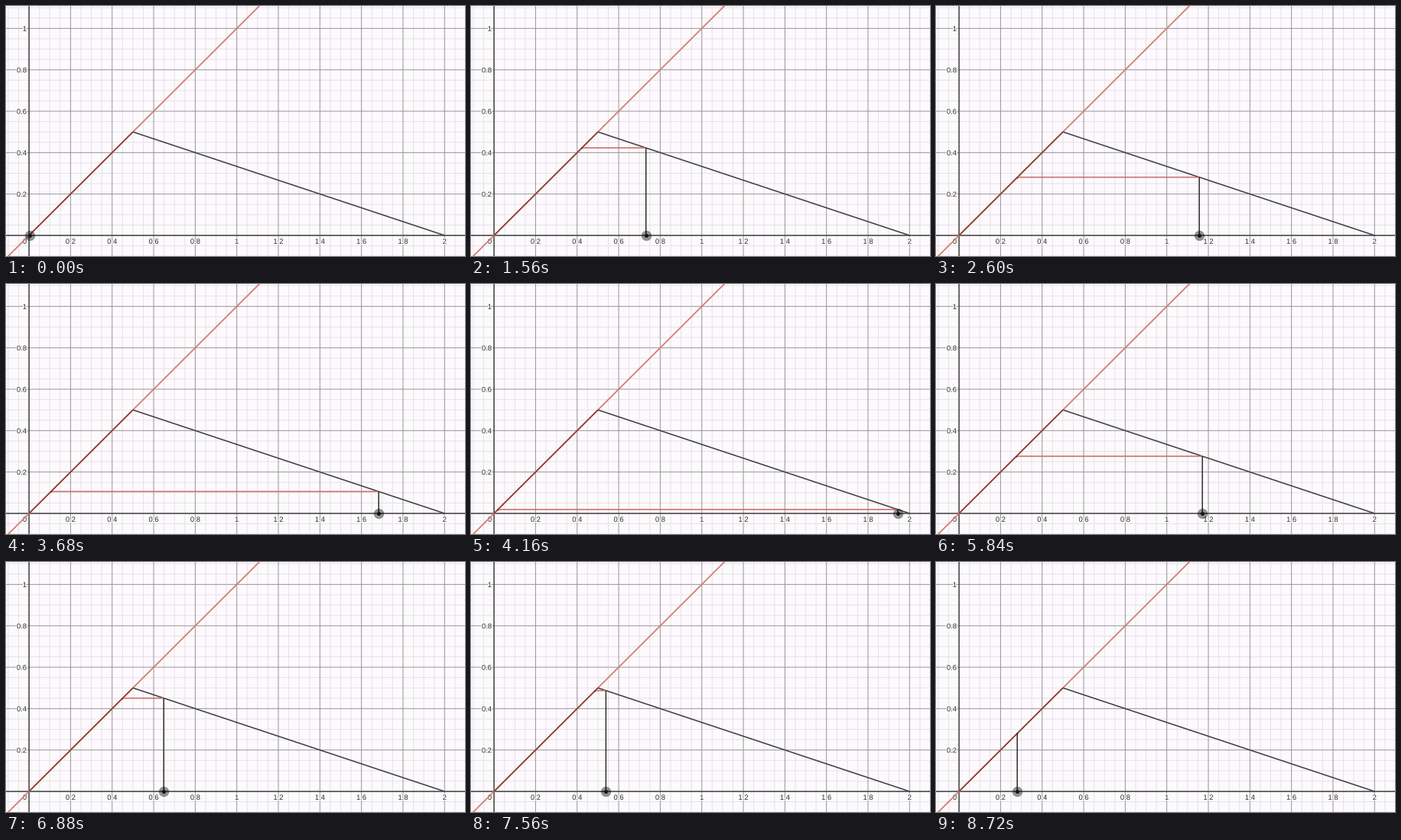
Animation of 600 by 328 pixels, one loop 9120 ms. Source, as a matplotlib script:

```python
import matplotlib.pyplot as plt
import matplotlib.patheffects as pe
import numpy as np
from matplotlib.animation import FuncAnimation

W, H, DPI = 600, 328, 100
STEP, LOOP = 40, 9120
PX = 72 / DPI                      # one pixel in points
X0, Y0, UNIT = 30.1, 301.0, 271.6  # origin and pixels per unit

PAPER, MINOR, MAJOR, AXIS = "#fcfafc", "#e6e2e6", "#989598", "#2e2e2e"
RED, DARK, BLEND = "#d67c78", "#434244", "#8a3c38"

# Dragged point: time in ms, position in pixels
PATH = np.array([
    (0, 31), (40, 33), (400, 82), (840, 150), (920, 150), (1120, 178),
    (1240, 178), (1560, 228.5), (2160, 304), (2600, 344), (3080, 423),
    (3680, 487), (4000, 533), (4280, 567), (4920, 469), (5840, 348),
    (6640, 206), (7000, 206), (7680, 166), (7760, 154), (8040, 154),
    (8720, 106), (9120, 106)], dtype=float)


def px(x):
    return X0 + UNIT * x


def py(y):
    return Y0 - UNIT * y


def slopes(t, v):
    """Tangents of a monotone cubic through the points."""
    d = np.diff(v) / np.diff(t)
    m = np.zeros(len(v))
    a, b = d[:-1], d[1:]
    same = a * b > 0
    m[1:-1][same] = 2 * a[same] * b[same] / (a + b)[same]
    m[0], m[-1] = d[0], d[-1]
    return m


TIMES, SPOTS = PATH.T
TANGENTS = slopes(TIMES, SPOTS)


def position(t):
    """Value on the x axis of the dragged point at time t."""
    k = min(np.searchsorted(TIMES, t, side="right") - 1, len(TIMES) - 2)
    h = TIMES[k + 1] - TIMES[k]
    s = (t - TIMES[k]) / h
    spot = ((1 + 2 * s) * (1 - s) ** 2 * SPOTS[k]
            + s * (1 - s) ** 2 * h * TANGENTS[k]
            + s * s * (3 - 2 * s) * SPOTS[k + 1]
            + s * s * (s - 1) * h * TANGENTS[k + 1])
    return (spot + 0.2 - X0) / UNIT


def tent(x):
    return x if x < 0.5 else (2 - x) / 3


fig = plt.figure(figsize=(W / DPI, H / DPI), dpi=DPI, facecolor=PAPER)
ax = fig.add_axes([0, 0, 1, 1])
ax.set_xlim(0, W)
ax.set_ylim(H, 0)
ax.axis("off")


def line(points, color, width, z):
    xs, ys = zip(*points)
    return ax.plot([px(x) for x in xs], [py(y) for y in ys], color=color,
                   lw=width * PX, zorder=z, solid_capstyle="butt",
                   snap=False)[0]


def marker(size, color, z, alpha=1):
    return ax.plot([], [], "o", ms=size * PX, mew=0, color=color,
                   alpha=alpha, zorder=z, snap=False)[0]


def grid(values, color, width, z):
    """Soft lines across the stage at the given values on both axes."""
    style = dict(colors=color, lw=width * PX, zorder=z, snap=False)
    ax.vlines(px(values), 0, H, **style)
    ax.hlines(py(values), 0, W, **style)


def label(x, y, text, ha="center"):
    ax.text(x, y, text, family="Liberation Sans", fontsize=9.4 * PX,
            color="#2e2c2e", ha=ha, va="center_baseline", zorder=4,
            path_effects=[pe.withStroke(linewidth=2.4 * PX,
                                        foreground=PAPER)])


ks = np.arange(-3, 44)
grid(ks[ks % 4 != 0] / 20, MINOR, 1, 1)
grid(ks[ks % 4 == 0] / 20, MAJOR, 1, 2)
grid(np.zeros(1), AXIS, 1.2, 3)

label(24.5, 308.4, "0")
for k in range(1, 11):
    label(px(k / 5), 308.4, f"{k / 5:g}")
    if k <= 5:
        label(27, py(k / 5), f"{k / 5:g}", "right")

line([(-0.2, -0.2), (1.2, 1.2)], RED, 1.8, 5)
line([(0, 0), (0.5, 0.5)], BLEND, 1.6, 6)
line([(0.5, 0.5), (2, 0)], DARK, 1.6, 6)

across = line([(0, 0), (0, 0)], "#d26c69", 1.6, 7)
drop = line([(0, 0), (0, 0)], "#2c2c2c", 1.5, 8)
corner = marker(1.8, "#3a1c1a", 8)
halo = marker(13.4, "#000000", 9, 0.42)
dot = marker(5, "#141414", 10)


def draw(i):
    a = position(i * STEP)
    b = tent(a)
    across.set_data([px(b), px(a)], [py(b), py(b)])
    drop.set_data([px(a), px(a)], [Y0, py(b)])
    corner.set_data([px(b)], [py(b)])
    for mark in (halo, dot):
        mark.set_data([px(a)], [Y0])
    return across, drop, corner, halo, dot


anim = FuncAnimation(fig, draw, frames=LOOP // STEP, interval=STEP,
                     repeat=True, repeat_delay=0)
plt.show()
```
